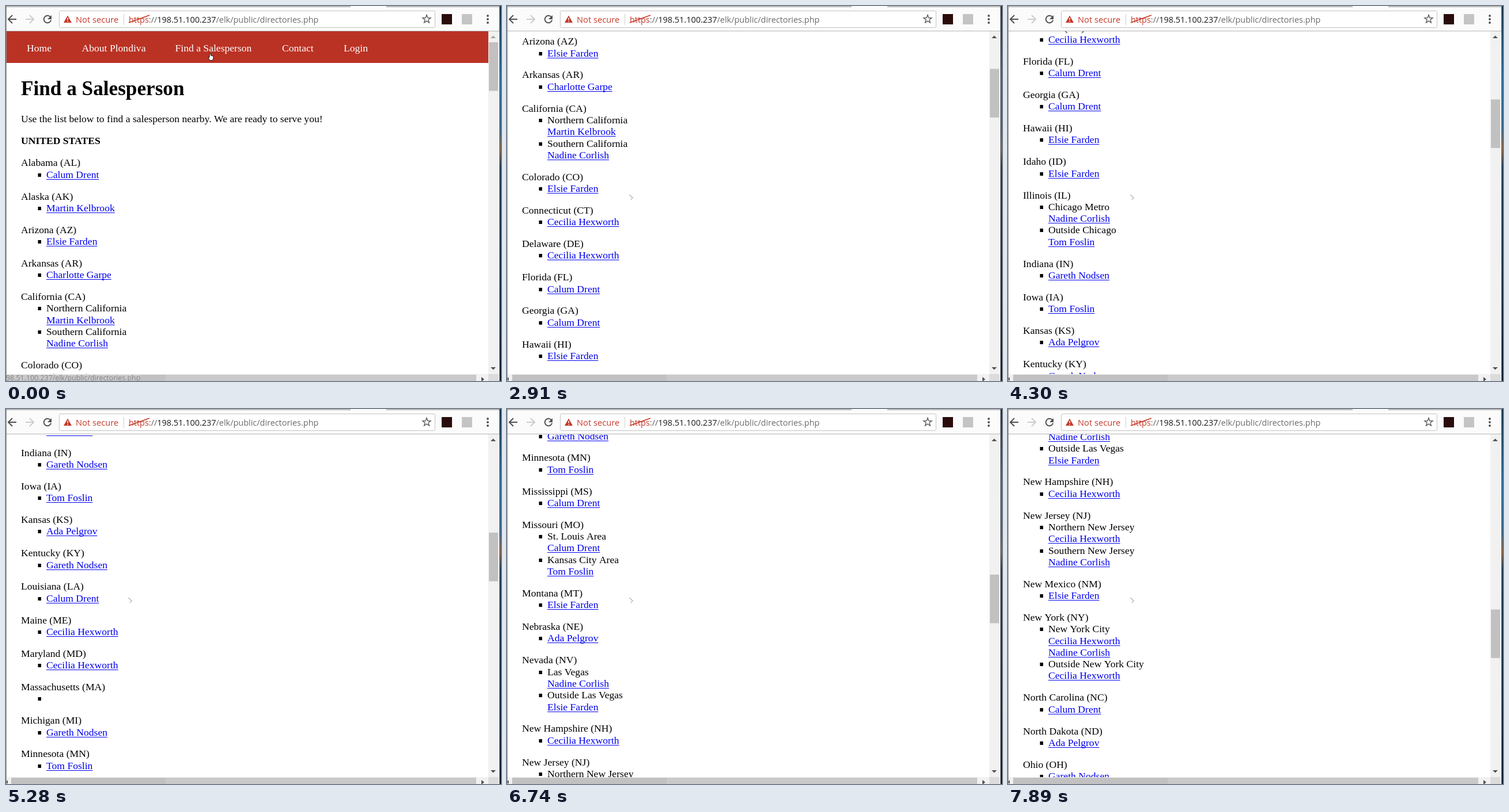
Write an HTML page with a canvas that moves like this. It is 859 by 652 pixels and loops after 8 s.

```html
<!DOCTYPE html>
<html lang="en">
<head>
<meta charset="utf-8">
<title>Find a Salesperson</title>
<style>
html, body { margin: 0; width: 100%; height: 100%; overflow: hidden; background: #fff; }
canvas { display: block; }
</style>
</head>
<body>
<canvas id="stage" width="859" height="652"></canvas>
<script>
const ctx = document.getElementById('stage').getContext('2d');
const LOOP = 8000;
const LINE = 20.3, GAP = 17.6;
const SERIF = '"Liberation Serif", "Times New Roman", serif';
const SANS = '"Open Sans", "Noto Sans", sans-serif';
const BODY = `17.6px ${SERIF}`;
const HOST = '198.51.100.237', PATH = '/elk/public/directories.php';

const PEOPLE = {
  C: 'Calum Drent', M: 'Martin Kelbrook', E: 'Elsie Farden', G: 'Charlotte Garpe',
  N: 'Nadine Corlish', H: 'Cecilia Hexworth', T: 'Tom Foslin', S: 'Gareth Nodsen', A: 'Ada Pelgrov'
};

// "State (XX)|item|item"; an item is "Area:links" or just link keys.
const TERRITORIES = `Alabama (AL)|C
Alaska (AK)|M
Arizona (AZ)|E
Arkansas (AR)|G
California (CA)|Northern California:M|Southern California:N
Colorado (CO)|E
Connecticut (CT)|H
Delaware (DE)|H
Florida (FL)|C
Georgia (GA)|C
Hawaii (HI)|E
Idaho (ID)|E
Illinois (IL)|Chicago Metro:N|Outside Chicago:T
Indiana (IN)|S
Iowa (IA)|T
Kansas (KS)|A
Kentucky (KY)|S
Louisiana (LA)|C
Maine (ME)|H
Maryland (MD)|H
Massachusetts (MA)|
Michigan (MI)|S
Minnesota (MN)|T
Mississippi (MS)|C
Missouri (MO)|St. Louis Area:C|Kansas City Area:T
Montana (MT)|E
Nebraska (NE)|A
Nevada (NV)|Las Vegas:N|Outside Las Vegas:E
New Hampshire (NH)|H
New Jersey (NJ)|Northern New Jersey:H|Southern New Jersey:N
New Mexico (NM)|E
New York (NY)|New York City:HN|Outside New York City:H
North Carolina (NC)|C
North Dakota (ND)|A
Ohio (OH)|S`;

// [time, scroll offset]
const SCROLL = [
  [0, 0], [1840, 7.7], [1960, 86], [2100, 112], [2220, 117], [2510, 145], [2720, 258],
  [2910, 327.5], [3200, 352], [3320, 440], [3460, 469], [3870, 640], [4030, 700], [4300, 703],
  [4510, 790], [4640, 850], [5000, 968], [5150, 1030], [5280, 1075], [5530, 1160], [5650, 1215],
  [5800, 1335], [5925, 1380], [6050, 1411], [6190, 1458], [6330, 1508], [6460, 1524],
  [6740, 1590], [6880, 1640], [7005, 1700], [7130, 1758], [7250, 1810], [7370, 1860],
  [7490, 1900], [7610, 1960], [7760, 1994], [7890, 2019]
];
// [time, x, y]
const POINTER = [[400, 250, 190], [520, 139, 314], [670, 188, 327], [820, 206, 327], [950, 212, 327]];

const lastKey = (keys, t) => keys.filter(k => k[0] <= t).pop();

function rect(x, y, w, h, color) {
  ctx.fillStyle = color;
  ctx.fillRect(x, y, w, h);
}

function text(str, x, y, font, color) {
  ctx.font = font;
  ctx.fillStyle = color;
  ctx.fillText(str, x, y);
  return ctx.measureText(str).width;
}

function stroke(points, color, width, fill) {
  ctx.beginPath();
  points.forEach(([x, y]) => ctx.lineTo(x, y));
  if (fill) {
    ctx.closePath();
    ctx.fillStyle = fill;
    ctx.fill();
  }
  ctx.strokeStyle = color;
  ctx.lineWidth = width;
  ctx.stroke();
}

function triangle(ax, ay, bx, by, cx, cy, color) {
  ctx.beginPath();
  ctx.moveTo(ax, ay);
  ctx.lineTo(bx, by);
  ctx.lineTo(cx, cy);
  ctx.fillStyle = color;
  ctx.fill();
}

function buildRows() {
  const rows = [];
  let y = 278.3;
  const add = row => { rows.push({ y, ...row }); y += LINE; };
  for (const entry of TERRITORIES.split('\n')) {
    const [state, ...items] = entry.split('|');
    add({ x: 26, str: state });
    for (const item of items) {
      const [area, keys] = item.includes(':') ? item.split(':') : ['', item];
      let bullet = true;
      if (area || !keys) {
        add({ x: 70, str: area, bullet });
        bullet = false;
      }
      for (const key of keys) {
        add({ x: 70, str: PEOPLE[key], link: true, bullet });
        bullet = false;
      }
    }
    y += GAP;
  }
  return rows;
}
const rows = buildRows();

function drawPage(scroll) {
  const at = y => Math.round(y - scroll);
  ctx.save();
  ctx.beginPath();
  ctx.rect(0, 44, 837, 596);
  ctx.clip();
  rect(0, 44 - scroll, 837, at(98.7) - 44 + scroll, '#ba3224');
  const nav = [['Home', 36], ['About Plondiva', 131.5], ['Find a Salesperson', 293.5], ['Contact', 479], ['Login', 586]];
  for (const [label, x] of nav) text(label, x, at(78.5), BODY, '#fff');
  text('Find a Salesperson', 26, at(154.5), `bold 35.2px ${SERIF}`, '#000');
  text('Use the list below to find a salesperson nearby. We are ready to serve you!', 26, at(202.4), BODY, '#000');
  text('UNITED STATES', 26, at(240.4), `bold 17.6px ${SERIF}`, '#000');
  for (const row of rows) {
    const y = at(row.y);
    if (y < 30 || y > 665) continue;
    const color = row.link ? '#0000ee' : '#000';
    const width = text(row.str, row.x, y, BODY, color);
    if (row.link) rect(row.x, y + 2, width, 1, color);
    if (row.bullet) rect(55.5, y - 8, 5.5, 6, '#000');
  }
  ctx.restore();
}

function drawScrollbars(scroll) {
  rect(837, 44, 18, 596, '#f1f1f1');
  rect(838, 63 + scroll / 7.07, 16, 84.5, '#c1c1c1');
  triangle(841, 56, 850, 56, 845.5, 51.5, scroll ? '#505050' : '#a3a3a3');
  triangle(841, 628, 850, 628, 845.5, 632.5, '#505050');
  rect(0, 640, 855, 12, '#f1f1f1');
  rect(9, 641, 268, 11, '#c1c1c1');
  rect(277, 641, 539, 11, '#c9c9c9');
  rect(837, 640, 18, 12, '#dcdcdc');
  triangle(825, 645, 825, 653, 830, 649, '#505050');
  triangle(3, 645, 3, 652, 0, 648.5, '#505050');
}

function drawStatus() {
  rect(0, 638, 232, 2, 'rgba(255,255,255,.6)');
  rect(0, 641, 232, 11, '#c9c9c9');
  text(HOST.slice(1) + PATH, 0, 651, `12.4px ${SANS}`, '#858585');
}

function drawArrowButton(x, dir, color) {
  stroke([[x - 7 * dir, 23], [x + 7 * dir, 23]], color, 2);
  stroke([[x, 16], [x - 7 * dir, 23], [x, 30]], color, 2);
}

function drawStar(cx, cy) {
  const points = Array.from({ length: 10 }, (_, i) => {
    const r = i % 2 ? 3.1 : 7.4, a = i * Math.PI / 5 - Math.PI / 2;
    return [cx + r * Math.cos(a), cy + r * Math.sin(a)];
  });
  stroke(points, '#5a5a5a', 1.4, '#fff');
}

function drawToolbar() {
  rect(0, 0, 857, 43, '#fbfbfb');
  rect(0, 0, 598, 2, '#d0d0d0');
  rect(0, 1, 598, 1, '#a6a6a6');
  rect(660, 0, 197, 2, '#d0d0d0');
  rect(660, 1, 197, 1, '#a6a6a6');
  rect(0, 43, 857, 1, '#b6b6b6');
  drawArrowButton(11, 1, '#505050');
  drawArrowButton(41, -1, '#cccccc');

  ctx.beginPath();
  ctx.arc(72, 23, 6.3, 0.25, Math.PI * 1.78);
  ctx.strokeStyle = '#505050';
  ctx.lineWidth = 2;
  ctx.stroke();
  triangle(79, 16, 79, 23, 72, 23, '#505050');

  ctx.beginPath();
  ctx.roundRect(92.5, 8.5, 652, 29, 2);
  ctx.fillStyle = '#fff';
  ctx.fill();
  ctx.strokeStyle = '#c4c4c4';
  ctx.lineWidth = 1;
  ctx.stroke();
  triangle(107, 16.5, 100, 29, 114, 29, '#c53929');
  rect(106.3, 20.5, 1.5, 4, '#fff');
  rect(106.3, 26, 1.5, 1.5, '#fff');
  text('Not secure', 121, 28.5, `14.7px ${SANS}`, '#c53929');
  rect(204, 14, 1, 19, '#cfcfcf');

  const parts = [['https', '#c53929'], ['://', '#5f5f5f'], [HOST, '#1a1a1a'], [PATH, '#6b6b6b']];
  let x = 213;
  for (const [part, color] of parts) x += text(part, x, 28.5, `14.45px ${SANS}`, color);
  stroke([[213, 29], [249, 16]], '#c53929', 1.8);

  drawStar(730, 23);
  rect(756, 14, 18, 18, '#2a0b0b');
  rect(791, 14, 18, 18, '#c4c4c4');
  for (const y of [17, 23, 29]) {
    ctx.beginPath();
    ctx.arc(836, y, 1.9, 0, Math.PI * 2);
    ctx.fillStyle = '#505050';
    ctx.fill();
  }
}

function drawWindowEdge() {
  rect(0, 0, 1, 652, '#8e8e8e');
  rect(855, 44, 1, 608, '#fafafa');
  rect(856, 0, 1, 652, '#6d6d6d');
  const sky = ctx.createLinearGradient(0, 0, 0, 652);
  const stops = [[0, '#12324a'], [0.2, '#2c6d9c'], [0.33, '#39668a'], [0.38, '#8a6648'], [0.43, '#1c3a58'], [1, '#0c1c30']];
  for (const [pos, color] of stops) sky.addColorStop(pos, color);
  rect(857, 0, 2, 652, sky);
}

function drawHand() {
  stroke([[353.5, 82.5], [355, 82.5], [355.5, 86], [359, 87], [360, 88.5], [359.5, 91.5],
    [358.5, 94.5], [354, 94.5], [351.5, 90.5], [351, 88.5], [353, 89.5]], '#222', 1, '#fff');
}

function drawPointer([, x, y]) {
  stroke([[x + 0.5, y + 1], [x + 6.5, y + 7]], '#777', 1);
  stroke([[x + 6.5, y + 7], [x + 3.5, y + 7.5]], '#aaa', 0.8);
  stroke([[x + 3, y + 8], [x + 4, y + 10.5]], '#999', 0.9);
}

function draw() {
  const t = performance.now() % LOOP;
  const scroll = lastKey(SCROLL, t)[1];
  rect(0, 0, 859, 652, '#fff');
  drawPage(scroll);
  drawScrollbars(scroll);
  if (t < 140) drawStatus();
  drawToolbar();
  drawWindowEdge();
  const pointer = lastKey(POINTER, t);
  if (pointer) drawPointer(pointer);
  else drawHand();
  requestAnimationFrame(draw);
}
draw();
</script>
</body>
</html>
```
